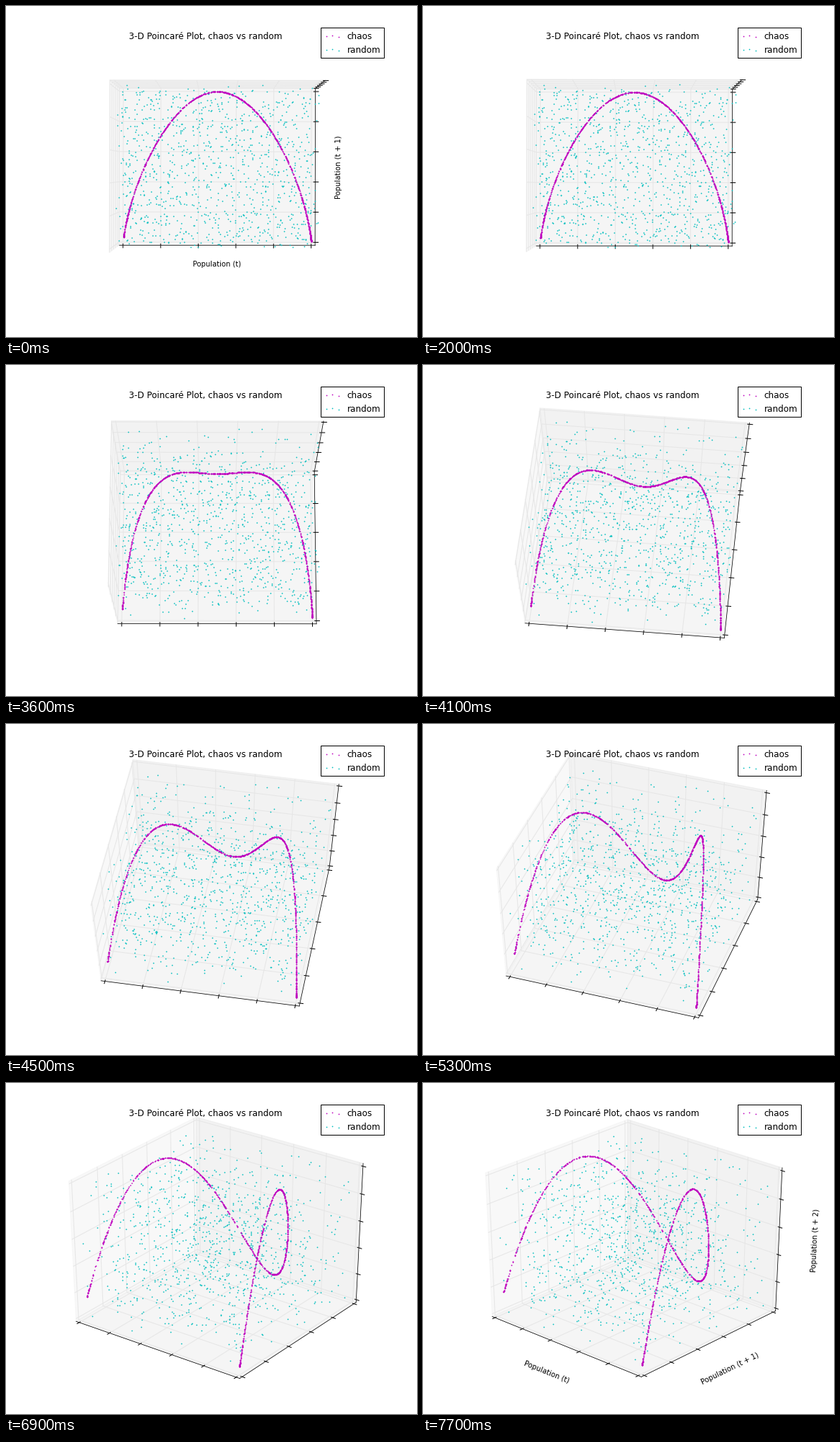
Write a matplotlib script that moves like this. It is 572x460 px and loops after 10 s.

```python
import numpy as np
import matplotlib.pyplot as plt
from matplotlib.animation import FuncAnimation
from matplotlib.collections import LineCollection, PolyCollection
from matplotlib.patches import Rectangle

W, H, DPI = 572, 460, 64
PX = 72 / DPI                     # points per pixel
FRAMES, INTERVAL = 100, 100

CENTER = np.array([294.0, 223.3])
SCALE = np.array([558, 446.4]) / 0.185
DIST = 11
EDGE = 25 / 48                    # half the cube plus its margin
FAR = np.array([-EDGE, EDGE, -EDGE])
TICKS = np.linspace(-0.5, 0.5, 6)
SIDE = (1, 0, 0)                  # direction of the ticks of each axis
NAMES = ("Population (t)", "Population (t + 1)", "Population (t + 2)")
MAGENTA, CYAN = (0.75, 0, 0.75), (0, 0.75, 0.75)
DOT = 3 * PX ** 2

# first frame, end frame, elevation step, azimuth step
MOVES = (
    (20, 23, 0.5, 0), (23, 37, 1.0, 0), (37, 61, 1.5, 1.1),
    (61, 65, 1.0, 1.1), (65, 74, 0.5, 1.1), (74, 77, 0.2, 0.5),
)


def camera(n):
    elev, azim = 89.9, 270.1
    for start, end, down, turn in MOVES:
        steps = min(max(n - start + 1, 0), end - start)
        elev -= down * steps
        azim += turn * steps
    return np.radians(elev), np.radians(azim)


def projector(n):
    """Return a function from centred cube coordinates to pixels."""
    elev, azim = camera(n)
    ce, se, ca, sa = np.cos(elev), np.sin(elev), np.cos(azim), np.sin(azim)
    right = np.array([-sa, ca, 0])
    up = np.array([-ca * se, -sa * se, ce])
    toward = np.array([ca * ce, sa * ce, se])

    def project(points):
        depth = DIST - points @ toward
        flat = np.stack([points @ right / depth, -(points @ up) / depth], axis=-1)
        return CENTER + SCALE * flat

    return project


def put(point, i, value):
    p = point.copy()
    p[i] = value
    return p


def others(i):
    return [k for k in range(3) if k != i]


def pane(i):
    a, b = others(i)
    corners = ((-EDGE, -EDGE), (EDGE, -EDGE), (EDGE, EDGE), (-EDGE, EDGE))
    return [put(put(FAR, a, u), b, v) for u, v in corners]


def axis_base(i):
    return put(FAR, SIDE[i], -FAR[SIDE[i]])


def axis_line(i):
    base = axis_base(i)
    return [put(base, i, -EDGE), put(base, i, EDGE)]


def grid_lines(i):
    a, b = others(i)
    spots = [put(FAR, i, t) for t in TICKS]
    return [[put(p, a, -FAR[a]), p, put(p, b, -FAR[b])] for p in spots]


def tick_marks(i):
    base, s = axis_base(i), SIDE[i]
    sign = np.sign(base[s])
    inner, outer = base[s] - sign / 120, base[s] + sign / 60
    spots = [put(base, i, t) for t in TICKS]
    return [[put(p, s, inner), put(p, s, outer)] for p in spots]


def label_spot(i):
    base = axis_base(i)
    return put(base + np.sign(base) * 1.6 / 12, i, 0)


def logistic(count, rate=3.99, pop=0.5):
    series = []
    for _ in range(count):
        series.append(pop)
        pop = pop * rate * (1 - pop)
    return np.array(series)


def triples(series):
    return np.column_stack([series[:-2], series[1:-1], series[2:]]) - 0.5


CHAOS = triples(logistic(1000))
RANDOM = triples(np.random.default_rng(7).random(1000))
PANES = np.array([pane(i) for i in range(3)])
AXES = np.array([axis_line(i) for i in range(3)])
GRID = np.array([line for i in range(3) for line in grid_lines(i)])
MARKS = np.array([line for i in range(3) for line in tick_marks(i)])
SPOTS = np.array([label_spot(i) for i in range(3)])

plt.rcParams["font.family"] = "DejaVu Sans"
fig = plt.figure(figsize=(W / DPI, H / DPI), dpi=DPI, facecolor="white")
ax = fig.add_axes([0, 0, 1, 1])
ax.set_xlim(0, W)
ax.set_ylim(H, 0)
ax.axis("off")

pane_colors = [(g, g, g, 0.5) for g in (0.95, 0.9, 0.925)]
panes = PolyCollection([], facecolors=pane_colors, edgecolors=pane_colors,
                       linewidths=PX, zorder=1)
axis_lines = LineCollection([], colors="black", linewidths=0.75 * PX,
                            capstyle="projecting", zorder=2)
grid = LineCollection([], colors=[(0.9, 0.9, 0.9)], linewidths=PX, zorder=2.1)
marks = LineCollection([], colors="black", linewidths=PX,
                       capstyle="projecting", zorder=2.2)
for item in (panes, axis_lines, grid, marks):
    ax.add_collection(item, autolim=False)


def dots(color, zorder, x=(), y=()):
    return ax.scatter(x, y, s=DOT, color=[color], linewidths=0, zorder=zorder)


random_dots = dots(CYAN, 3)
chaos_dots = dots(MAGENTA, 4)

labels = [ax.text(0, 0, name, fontsize=10 * PX, ha="center", va="center",
                  zorder=5) for name in NAMES]

ax.text(277.5, 46, "3-D Poincaré Plot, chaos vs random", fontsize=12 * PX,
        ha="center", va="baseline", zorder=6)

ax.add_patch(Rectangle((438, 30), 88, 42, facecolor="white",
                       edgecolor="black", linewidth=PX, zorder=7))
for name, color, y in (("chaos", MAGENTA, 42), ("random", CYAN, 61)):
    dots(color, 8, (446, 454.4, 462.8), (y + 0.2, y - 1.3, y + 0.9))
    ax.text(474.6, y + 4, name, fontsize=12 * PX, va="baseline", zorder=8)


def draw(n):
    project = projector(n)
    panes.set_verts(project(PANES))
    lines = project(AXES)
    axis_lines.set_segments(lines)
    grid.set_segments(project(GRID))
    marks.set_segments(project(MARKS))
    random_dots.set_offsets(project(RANDOM))
    chaos_dots.set_offsets(project(CHAOS))

    shown = 2 if n < 20 else 3 if n >= 77 else 0
    spots = project(SPOTS)
    for i, label in enumerate(labels):
        dx, dy = lines[i][1] - lines[i][0]
        label.set_position(spots[i])
        label.set_rotation(np.degrees(np.arctan2(-dy, dx)))
        label.set_visible(i < shown)
    return []


anim = FuncAnimation(fig, draw, frames=FRAMES, interval=INTERVAL,
                     init_func=lambda: draw(0), repeat=True, repeat_delay=0)
plt.show()
```
